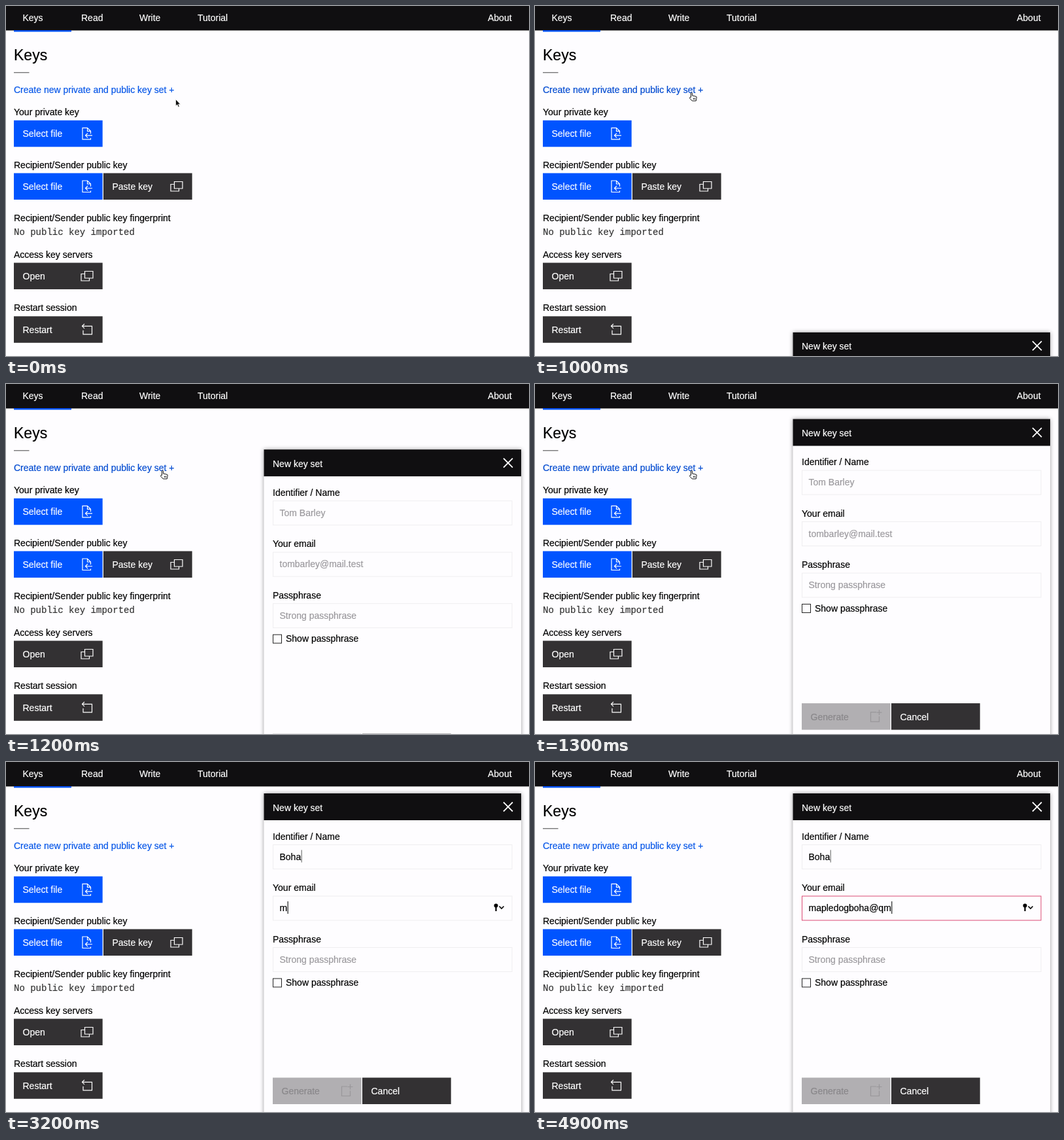
These frames come from a looping animation (800 by 535 pixels, 5000 ms). An HTML page:

```html
<!DOCTYPE html>
<html lang="en">
<head>
<meta charset="utf-8">
<title>Keys</title>
<style>
  html, body { margin: 0; width: 100%; height: 100%; overflow: hidden; background: #fefdff; }
  svg { display: block; width: 800px; height: 535px; }
  text {
    font: 14px "Liberation Sans", Arial, sans-serif;
    color: #000; fill: currentColor; stroke: currentColor; stroke-width: .2;
  }
  .title { font-size: 23px; }
  .mono { font-family: "Liberation Mono", monospace; color: #333; }
  .light { color: #fff; }
  .hint { color: #9b999d; }
  .off { color: #89878a; }
  .line { fill: none; stroke: #fff; stroke-width: 1.2; }
  .box { fill: none; stroke: #efeef0; }
  .shade { filter: drop-shadow(0 0 3px #0006); }
  .caret { stroke: #222; stroke-width: 1.2; }
</style>
</head>
<body>
<svg id="stage" viewBox="0 0 800 535"></svg>
<script>
const BLACK = '#100f11', DARK = '#333133', BLUE = '#0054ff';
const NAME = 'Boha', EMAIL = 'mapledogboha@qm';
const LOOP = 5000, STEP = 100;

const text = (x, y, s, cls = '', id = '') => `<text x="${x}" y="${y}" class="${cls}" id="${id}">${s}</text>`;
const rect = (x, y, w, h, fill, cls = '') =>
  `<rect x="${x}" y="${y}" width="${w}" height="${h}" fill="${fill}" class="${cls}"/>`;
const path = (d, x = 0, y = 0, attrs = 'class="line"') => `<path d="${d}" transform="translate(${x} ${y})" ${attrs}/>`;

// Icon paths relative to the top left corner of their button
const ICON = {
  file: 'M117.5 27v2H105V11.5h7.500l5 5v4M112.500 11.5v5h5M120 23H110M113 19.5l-3.500 3.500 3.500 3.500',
  copy: 'M108.500 13h12.500v10.500h-12.500zM108.500 17h-5.500v10.500h12.500v-4',
  restart: 'M108 11.5l-3.500 3.500 3.500 3.500M104.500 15h15v12.500H106v-6',
  add: 'M114 13.500h-8.500v14.500h13v-8M118.500 10v8M114.500 14h8'
};
const button = (x, y, label, fill, icon, cls = 'light') =>
  rect(x, y, 135.7, 40.5, fill) + text(x + 13.5, y + 25.5, label, cls) +
  (icon ? path(ICON[icon], x, y, `class="line"${cls === 'off' ? ' style="stroke:#99979a"' : ''}`) : '');

const field = (y, label, hint, id) =>
  text(408, y - 7.5, label) +
  `<rect x="408.500" y="${y + .5}" width="365.500" height="37" class="box" id="${id}Box"/>` +
  text(418.5, y + 23.5, hint, 'hint', id) +
  `<path d="M0 ${y + 8.5}v19" class="caret" id="${id}Caret"/>`;

const page =
  rect(0, 0, 800, 37.4, BLACK) + rect(12, 37, 88, 2.4, BLUE) +
  [['Keys', 25.5], ['Read', 115], ['Write', 204], ['Tutorial', 293], ['About', 737]]
    .map(([s, x]) => text(x, 22.5, s, 'light')).join('') +
  text(12, 83, 'Keys', 'title') + rect(12, 101.3, 23.5, 1, '#444') +
  text(12, 132.5, 'Create new private and public key set +', '', 'link') +
  text(12, 167, 'Your private key') + button(12, 174.8, 'Select file', BLUE, 'file') +
  text(12, 248, 'Recipient/Sender public key') +
  button(12, 255.5, 'Select file', BLUE, 'file') + button(149, 255.5, 'Paste key', DARK, 'copy') +
  text(12, 329, 'Recipient/Sender public key fingerprint') +
  text(12, 350, 'No public key imported', 'mono') +
  text(12, 384.5, 'Access key servers') + button(12, 392.5, 'Open', DARK, 'copy') +
  text(12, 466, 'Restart session') + button(12, 474.3, 'Restart', DARK, 'restart');

const panel =
  rect(394.5, 48, 393.5, 500, '#fefdff', 'shade') + rect(394.5, 48, 393.5, 41, BLACK) +
  text(408, 74.5, 'New key set', 'light') +
  path('M761 61.500l14 14M775 61.500l-14 14', 0, 0, 'class="line" style="stroke-width:1.8"') +
  field(126, 'Identifier / Name', 'Tom Barley', 'name') +
  field(204.5, 'Your email', 'tombarley@mail.test', 'email') +
  field(283, 'Passphrase', 'Strong passphrase', 'pass') +
  '<rect x="408.500" y="331" width="13" height="13" fill="none" stroke="#222"/>' +
  text(428, 342, 'Show passphrase') +
  button(408, 482.5, 'Generate', '#b1afb2', 'add', 'off') + button(545, 482.5, 'Cancel', DARK) +
  '<g id="keyIcon"><circle cx="749.500" cy="219.500" r="3"/><path d="M749.500 220v8" stroke="#000" stroke-width="2.200"/>' +
  '<path d="M754.500 220.500l3.500 3.500 3.500-3.500" fill="none" stroke="#000" stroke-width="1.600"/></g>';

const outline = 'stroke="#fff" stroke-width=".8" fill="#111"';
const cursors =
  path('M0 0V10.500L2.400 8.300 4 12 5.800 11.200 4.200 7.700H7.300Z', 0, 0, `id="arrow" ${outline}`) +
  path('M-1.500 7V.5Q-.5-1 .6.500V4.500L6 5.700Q7.300 6 7.200 7.500L6.300 12.500H.3L-3.600 8.200Q-3.500 6.500-1.500 7ZM2.500 8v2.500M4.500 8v2.500', 0, 0,
    'id="hand" fill="#fff" stroke="#111"') +
  path('M-2.500-6.500Q0-6.500 0-5V5Q0 6.500-2.500 6.500M2.500-6.500Q0-6.500 0-5M0 5Q0 6.500 2.500 6.500M-1.500 1h3', 0, 0,
    'id="beam" fill="none" stroke="#222" stroke-width="1.200"');

const $ = id => document.getElementById(id);
$('stage').innerHTML = page + `<g id="panel">${panel}</g>` + cursors;

const show = (id, on) => $(id).style.display = on ? '' : 'none';
const clamp = v => Math.max(0, Math.min(1, v));
const smooth = v => (v = clamp(v), v * v * (3 - 2 * v));
const mix = (a, b, k) => a + (b - a) * k;
const hints = { name: 'Tom Barley', email: 'tombarley@mail.test' };

function emailLength(t) {
  if (t < 3200) return 0;
  if (t < 4200) return Math.min(8, (t - 3100) / STEP);
  if (t < 4600) return Math.min(12, 9 + (t - 4200) / STEP);
  return 12 + (t - 4600) / STEP;
}

function type(id, value, length, focused) {
  const el = $(id);
  el.textContent = length ? value.slice(0, length) : hints[id];
  el.setAttribute('class', length ? '' : 'hint');
  const x = 419.5 + (length ? el.getComputedTextLength() : 0);
  $(id + 'Caret').setAttribute('transform', `translate(${x} 0)`);
  show(id + 'Caret', focused);
}

function pointer(t) {
  const toLink = smooth((t - 600) / 300), toField = smooth((t - 1300) / 500);
  const x = mix(mix(259.5, 240, toLink), 445, toField);
  const y = mix(mix(142.5, 132.5, toLink), 140.5, toField);
  const kind = t >= 2200 ? '' : x > 408 ? 'beam' : y < 137 && x < 257 ? 'hand' : 'arrow';
  for (const id of ['arrow', 'hand', 'beam']) {
    show(id, id === kind);
    $(id).setAttribute('transform', `translate(${x} ${y})`);
  }
  $('link').style.color = kind === 'hand' ? '#004ad0' : '#0757e8';
}

function draw(t) {
  pointer(t);
  const rest = (1 - clamp((t - 990) / 400)) ** 3;
  $('panel').setAttribute('transform', `translate(0 ${486.5 * rest})`);
  show('panel', t > 990);

  type('name', NAME, Math.max(0, Math.min(4, (t - 2100) / STEP)), t >= 1900);
  type('email', EMAIL, emailLength(t), t >= 2800);
  $('nameCaret').style.stroke = t >= 2800 ? '#777' : '#222';
  show('passCaret', false);
  show('keyIcon', t >= 2800);
  $('emailBox').style.stroke = t >= 3300 ? '#dc4a74' : '';
}

const start = performance.now();
function tick() {
  const t = Math.max(0, performance.now() - start) % LOOP;
  draw(Math.floor(t / STEP) * STEP);
  requestAnimationFrame(tick);
}
tick();
</script>
</body>
</html>
```
